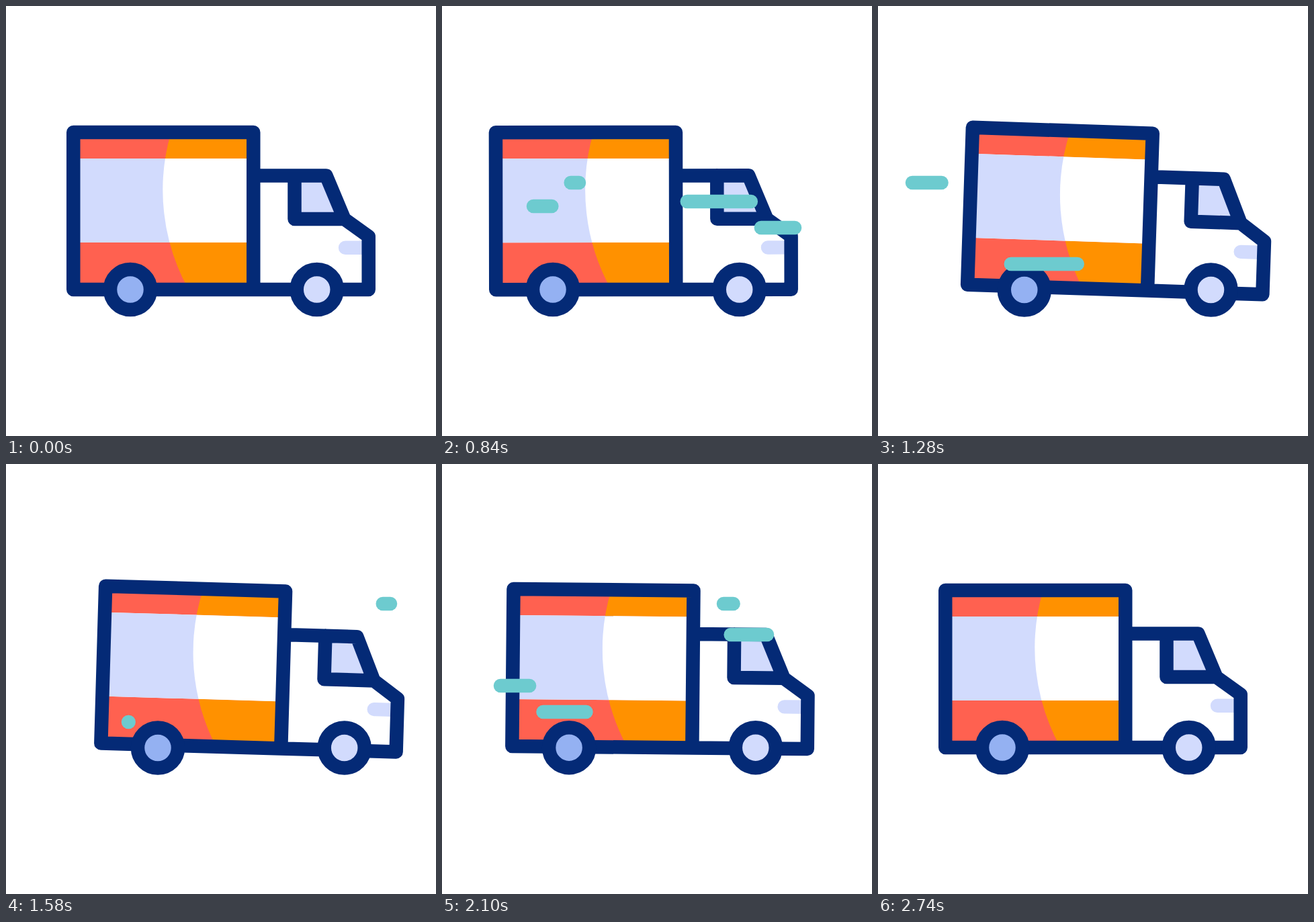
Write an HTML page that moves like this. It is 640 px wide and 640 px high and loops after 2.8 s.

```html
<!DOCTYPE html>
<html lang="en">
<head>
<meta charset="utf-8">
<title>Delivery truck</title>
<style>
  html, body { margin: 0; height: 100%; overflow: hidden; background: #fff; }
  svg { display: block; width: 100%; height: 100%; }
  .line { fill: none; stroke: #042a76; stroke-width: 20.5; stroke-linecap: round; stroke-linejoin: round; }
  #streaks { stroke: #6dcbcf; stroke-width: 20.5; stroke-linecap: round; }
</style>
</head>
<body>
<svg viewBox="0 0 640 640">
  <clipPath id="lit"><path d="M245.700 188A305 305 0 0 0 271.700 422H368V188z"/></clipPath>
  <g id="body">
    <path fill="#fff" d="M368 252H476L503 317L540 343V422H368z"/>
    <path fill="#ff6150" d="M100 188H368V227H100zM100 352H368V422H100z"/>
    <path fill="#d2dbfd" d="M100 227H368V352H100z"/>
    <g clip-path="url(#lit)">
      <path fill="#ff9100" d="M100 188H368V227H100zM100 352H368V422H100z"/>
      <path fill="#fff" d="M100 227H368V352H100z"/>
    </g>
    <path fill="#d2dbfd" d="M429 252H476L503 317H429zM540 349.500H505a10.200 10.200 0 0 0 0 20.400H540z"/>
    <path class="line" d="M100.250 188H368.250V422H100.250zM368.250 252.500H476.500L503.500 317L539.700 343V422H368M429.500 252.500V317H503.500"/>
  </g>
  <g id="wheels">
    <circle class="line" cx="185" cy="422" r="30" style="fill:#94b1f2"/>
    <circle class="line" cx="462.700" cy="422" r="30" style="fill:#d2dbfd"/>
  </g>
  <g id="streaks"></g>
</svg>
<script>
const LOOP = 2800, STEP = 20;
const SWEEP = 480, LAG = 220; // travel time of a streak's head, delay of its tail

const $ = id => document.getElementById(id);

// Smooth step from 0 to 1 between two times
function ramp(t, from, to) {
  const p = Math.min(1, Math.max(0, (t - from) / (to - from)));
  return (1 - Math.cos(Math.PI * p)) / 2;
}

// Back up, dash ahead, fall back, settle
const shift = t => -20 * ramp(t, 220, 835) + 61 * ramp(t, 835, 1420)
  - 64.5 * ramp(t, 1775, 2370) + 23.5 * ramp(t, 2370, 2740);

// Nose up, nose down, ease off, nod, level
const tilt = t => -2.85 * ramp(t, 220, 580) + 4.75 * ramp(t, 580, 1050)
  - 1.4 * ramp(t, 1400, 2080) + 1.75 * ramp(t, 2080, 2340) - 2.25 * ramp(t, 2340, 2700);

// A streak sweeps left from x: its head leads and its tail catches up
function streak(x, y, start, travel) {
  const line = document.createElementNS("http://www.w3.org/2000/svg", "line");
  line.setAttribute("y1", y);
  line.setAttribute("y2", y);
  $("streaks").append(line);
  return t => {
    const at = begin => x - travel * ramp(t, begin, begin + SWEEP);
    const visible = t > start && t < start + SWEEP + LAG;
    line.setAttribute("x1", at(start));
    line.setAttribute("x2", at(start + LAG));
    line.setAttribute("visibility", visible ? "visible" : "hidden");
  };
}

const short = (x, y, start) => streak(x, y, start, 97);
const long = (x, y, start) => streak(x, y, start, 153);

const streaks = [
  short(233, 298, 311), short(571, 330, 388), long(508, 291, 438),
  long(204, 263, 752), long(335, 384, 900), long(572, 208, 1496),
  short(184, 330, 1623), short(231, 369, 1750), long(484, 254, 1905)
];

function draw(t) {
  const x = shift(t), angle = tilt(t);
  $("body").setAttribute("transform", `translate(${x} 0) rotate(${angle} 320 422)`);
  $("wheels").setAttribute("transform", `translate(${x} ${angle * 0.3})`);
  streaks.forEach(update => update(t));
}

const begin = performance.now();
function tick() {
  const t = (performance.now() - begin) % LOOP;
  draw(Math.floor(t / STEP) * STEP);
  requestAnimationFrame(tick);
}
tick();
</script>
</body>
</html>
```
